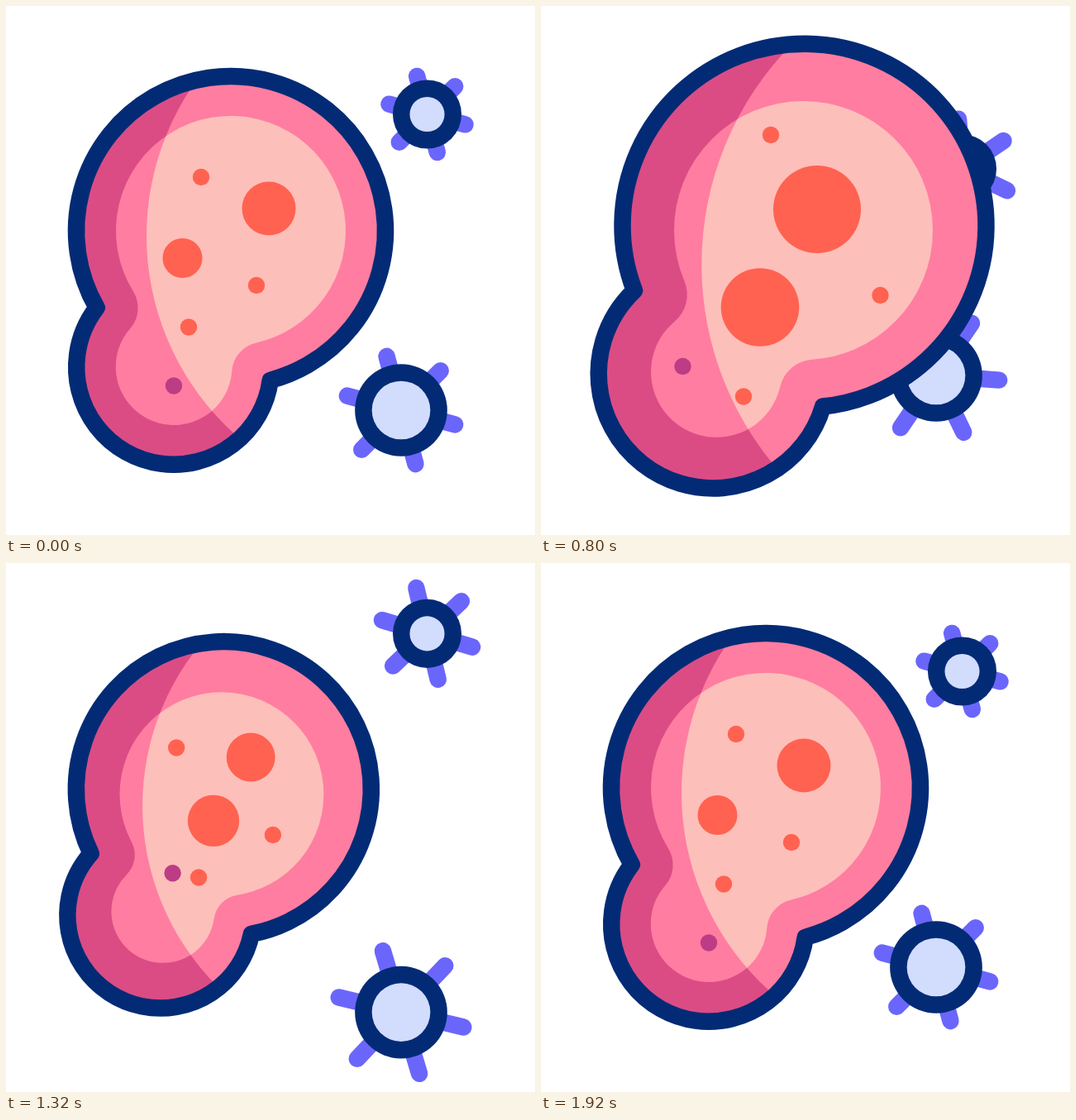
An HTML page with a canvas for the animation above (2000 ms loop, 640 by 640 pixels).

```html
<!DOCTYPE html>
<html lang="en">
<head>
<meta charset="utf-8">
<title>Cell and viruses</title>
<style>
html, body { margin: 0; width: 100%; height: 100%; overflow: hidden; background: #fff; }
canvas { display: block; width: 100vmin; height: 100vmin; }
</style>
</head>
<body>
<canvas id="stage" width="640" height="640"></canvas>
<script>
const ctx = document.getElementById('stage').getContext('2d');
const LOOP = 2000, STEP = 40, START = 120, END = 1920;
const DEG = Math.PI / 180, TAU = Math.PI * 2;
const LINE = 20.5;
const C = {
  navy: '#032b75', pink: '#ff7da0', dark: '#db4c85', pale: '#fdbfba',
  coral: '#ff6250', plum: '#bc3c85', spike: '#6b66fb', ice: '#d2dcfd'
};

// Key times; every track returns to its first value at END.
const CELL_T = [START, 480, 800, 960, 1160, 1480, END];
const VIRUS_T = [START, 480, 640, 800, 960, 1160, 1270, 1480, END];

const cell = {
  x: [272, 297, 318.5, 305.5, 273, 260.5],
  r: [187, 204.7, 220, 207.2, 185.7, 176.2],
  turn: [0, 4.1, 8.9, 7.7, 5.7, 2.4]
};
const core = {
  x: [272, 296, 317.5, 303.7, 270.5, 258.5],
  y: [272, 271, 271.5, 274, 279, 279],
  r: [139, 148, 156.5, 146, 128.5, 123]
};
const spots = [
  { x: [318, 328.5, 334, 326, 301.5, 297], y: [245, 246.5, 246, 242.5, 236, 236],
    r: [32.5, 42, 53, 45.5, 33.5, 28] },
  { x: [213.5, 242.5, 265, 266.5, 258, 243], y: [305, 331.5, 364.5, 349, 323, 305.5],
    r: [24, 34.7, 47.3, 42.5, 35, 28.4] },
  { x: [236, 256.5, 278, 258.5, 216, 206.5], y: [207, 184, 156, 177.5, 212, 227] },
  { x: [303, 355.5, 410.5, 388.5, 341.5, 312], y: [338, 340.5, 350, 343.5, 332, 329] },
  { x: [221, 238.5, 245, 246, 237, 230], y: [388.5, 427, 472.5, 445, 397, 374] },
  { x: [203, 191, 171.5, 185.5, 197, 204], y: [459.5, 451, 436, 415, 378, 385.5],
    fill: C.plum }
];
const viruses = [
  { x: 509.5, ring: 31.3, spin: -1,
    y: [131, 198.5, 216, 197, 142, 88, 82.5, 100],
    reach: [47.7, 55, 58, 60.5, 61.2, 59.5, 58, 53.5] },
  { x: 478, ring: 45.6, spin: 1,
    y: [489, 450, 434, 447, 490.5, 540.5, 546, 530],
    reach: [67.5, 71.3, 74, 76.5, 78.7, 79.2, 78.3, 74.5] }
];

// Smooth curve through the keys, at rest at both ends.
function track(times, vals, t) {
  const v = [...vals, vals[0]], last = v.length - 1;
  if (t <= times[0] || t >= times[last]) return v[0];
  const i = times.findIndex((k, n) => t < times[n + 1]);
  const slope = n => n === 0 || n === last ? 0
    : (v[n + 1] - v[n - 1]) / (times[n + 1] - times[n - 1]);
  const span = times[i + 1] - times[i], u = (t - times[i]) / span, w = 1 - u;
  return v[i] * w * w * (1 + 2 * u) + slope(i) * span * u * w * w
    + v[i + 1] * u * u * (3 - 2 * u) - slope(i + 1) * span * u * u * w;
}

function ease(x, x1, x2) {
  let lo = 0, hi = 1, s = 0.5;
  for (let n = 0; n < 24; n++) {
    const w = 1 - s;
    if (3 * s * w * w * x1 + 3 * s * s * w * x2 + s * s * s < x) lo = s; else hi = s;
    s = (lo + hi) / 2;
  }
  return s * s * (3 - 2 * s);
}

function disc(x, y, r, fill) {
  ctx.beginPath();
  ctx.arc(x, y, r, 0, TAU);
  ctx.fillStyle = fill;
  ctx.fill();
}

// Two joined circles; f rounds the waist between them.
function blob(x, y, R, r, d, dir, f) {
  const p = new Path2D();
  const A = R + f, B = r + f;
  const beta = Math.acos((A * A - B * B + d * d) / (2 * d * A));
  const lx = x + d * Math.cos(dir), ly = y + d * Math.sin(dir);
  const side = s => {
    const a = dir + s * beta;
    const px = x + A * Math.cos(a), py = y + A * Math.sin(a);
    return { a, px, py, b: Math.atan2(py - ly, px - lx) };
  };
  const left = side(1), right = side(-1);
  p.arc(x, y, R, left.a, right.a + TAU);
  if (f) p.arc(right.px, right.py, f, right.a + Math.PI, right.b + Math.PI, true);
  p.arc(lx, ly, r, right.b, left.b);
  if (f) p.arc(left.px, left.py, f, left.b + Math.PI, left.a + Math.PI, true);
  p.closePath();
  return p;
}

function drawVirus(v, t, turn) {
  const y = track(VIRUS_T, v.y, t), reach = track(VIRUS_T, v.reach, t);
  ctx.strokeStyle = C.spike;
  ctx.lineWidth = LINE;
  ctx.lineCap = 'round';
  ctx.beginPath();
  for (let k = 0; k < 6; k++) {
    const a = (15 + 60 * k + v.spin * turn) * DEG;
    ctx.moveTo(v.x, y);
    ctx.lineTo(v.x + reach * Math.cos(a), y + reach * Math.sin(a));
  }
  ctx.stroke();
  disc(v.x, y, v.ring + LINE / 2, C.navy);
  disc(v.x, y, v.ring - LINE / 2, C.ice);
}

function drawCell(t) {
  const at = vals => track(CELL_T, vals, t);
  const x = at(cell.x), R = at(cell.r), y = 272 - 0.19 * (R - 187);
  const turn = at(cell.turn) * DEG, dir = turn + 112.7 * DEG;
  const body = blob(x, y, R, R * 0.63, R * 0.956, dir, 0);
  const r = at(core.r);
  const inner = blob(at(core.x), at(core.y), r, r * 0.506, r * 1.284, dir, r * 0.273);

  const k = R / 187, cos = Math.cos(turn), sin = Math.sin(turn);
  const sx = x + k * (221 * cos - 6 * sin), sy = y + k * (221 * sin + 6 * cos);
  const shaded = (path, shade, light) => {
    ctx.save();
    ctx.clip(path);
    ctx.fillStyle = shade;
    ctx.fillRect(0, 0, 640, 640);
    disc(sx, sy, 323 * k, light);
    ctx.restore();
  };
  shaded(body, C.dark, C.pink);
  shaded(inner, C.pink, C.pale);

  ctx.strokeStyle = C.navy;
  ctx.lineWidth = LINE;
  ctx.lineJoin = 'round';
  ctx.stroke(body);

  for (const s of spots) disc(at(s.x), at(s.y), s.r ? at(s.r) : 10.2, s.fill || C.coral);
}

function draw(t) {
  ctx.fillStyle = '#fff';
  ctx.fillRect(0, 0, 640, 640);
  const u = Math.min(1, Math.max(0, (t - START) / (END - START)));
  const turn = 180 * ease(u, 0.34, 0.8);
  for (const v of viruses) drawVirus(v, t, turn);
  drawCell(t);
}

let begin = null;
function tick(now) {
  if (begin === null) begin = now;
  const t = (now - begin) % LOOP;
  draw(Math.floor(t / STEP) * STEP);
  requestAnimationFrame(tick);
}
draw(0);
requestAnimationFrame(tick);
</script>
</body>
</html>
```
